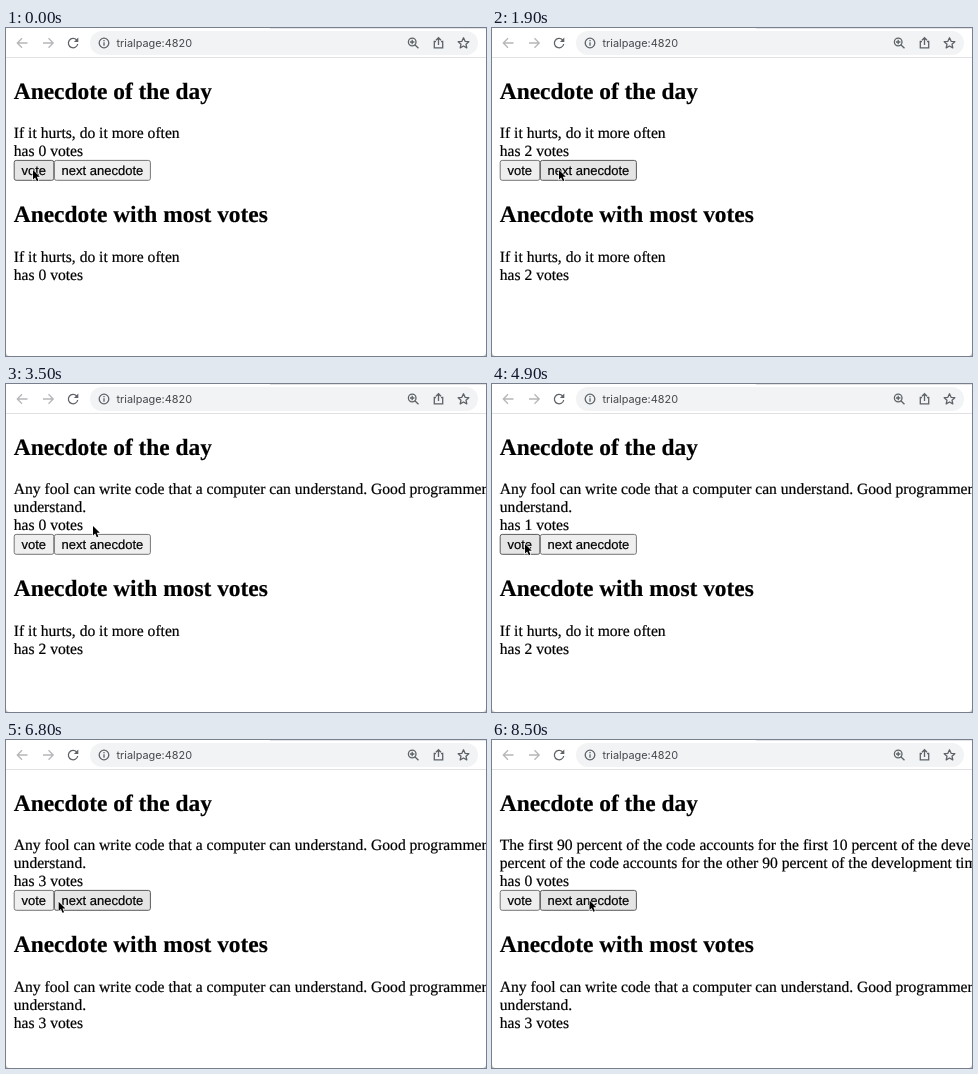
Recreate the animation shown at these times as an HTML page. Size 480x328 px, loop 9000 ms.

```html
<!DOCTYPE html>
<html lang="en">
<head>
<meta charset="utf-8">
<title>Anecdotes</title>
<style>
  html, body { margin: 0; width: 100%; height: 100%; overflow: hidden; background: #fff; }
  svg { display: block; }
  #page text {
    font: 15.6px "Liberation Serif", Times, serif;
    stroke: #000; stroke-width: .2px; text-rendering: geometricPrecision;
  }
  #page .heading { font-size: 23.4px; font-weight: bold; }
  #page .button text { font: 13px "Liberation Sans", Arial, sans-serif; text-anchor: middle; }
  .button rect { fill: #efefef; stroke: #767676; }
  .button.hover rect { fill: #e5e5e5; stroke: #5a5a5a; }
  .button.active rect { fill: #f5f5f5; stroke: #a0a0a0; }
  .icon { fill: none; stroke: #5f6368; stroke-width: 1.3; }
  .dim { stroke: #b4b6b9; }
  .address { font: 10.9px Inter, "Liberation Sans", sans-serif; fill: #45484c; }
</style>
</head>
<body>
<svg width="480" height="328" viewBox="0 0 480 328">
  <g id="page">
    <text class="heading" x="7.8" y="70.6">Anecdote of the day</text>
    <g id="daily"></g>
    <g id="lower">
      <g class="button" id="vote">
        <rect x="8.2" y="132.4" width="39.6" height="19.9" rx="2"/>
        <text x="27.8" y="146.9">vote</text>
      </g>
      <g class="button" id="next">
        <rect x="48.4" y="132.4" width="96" height="19.9" rx="2"/>
        <text x="96.4" y="146.9">next anecdote</text>
      </g>
      <text class="heading" x="7.8" y="194.2">Anecdote with most votes</text>
      <g id="best"></g>
    </g>
  </g>

  <g id="toolbar">
    <path d="M264 0H480V1H264Z" fill="#e2e4e7"/>
    <path d="M0 29.5H480" stroke="#dfe1e3"/>
    <rect x="84" y="3" width="388" height="24" rx="12" fill="#f1f3f4"/>
    <path class="icon dim" d="M21.5 15H11.5M16 10.3L11.3 15L16 19.7"/>
    <path class="icon dim" d="M37 15H47M42.5 10.3L47.2 15L42.5 19.7"/>
    <path class="icon" d="M70.6 12A4.7 4.7 0 1 0 71.7 16"/>
    <path d="M72.3 9.6V14H67.9Z" fill="#5f6368"/>
    <circle class="icon" cx="98" cy="15" r="4.8"/>
    <path class="icon" d="M98 14.3V17.7M98 12V13.2"/>
    <text class="address" x="110.5" y="18.8">trialpage:4820</text>
    <path class="icon" d="M408.8 16.8L412.5 20.3M404 14H408.4M406.2 11.8V16.2"/>
    <circle class="icon" cx="406.2" cy="14" r="3.8"/>
    <path class="icon" d="M430 13.5H428.3V19.8H436.7V13.5H435M432.5 17V10M430 12.2L432.5 9.7L435 12.2"/>
    <path class="icon" stroke-linejoin="round"
      d="M457.5 9.8L459.1 13.3L462.8 13.7L460 16.2L460.8 19.9L457.5 18L454.2 19.9L455 16.2L452.2 13.7L455.9 13.3Z"/>
  </g>
  <path d="M0 324A4 4 0 0 0 4 328H0ZM480 324A4 4 0 0 1 476 328H480Z" fill="#c4c4c4"/>

  <g id="cursor">
    <circle id="ring" r="15.8" fill="none" stroke="#111" stroke-width="2.4"/>
    <path d="M0 0V9.4L2.2 7.4L3.8 11.2L5.4 10.5L3.8 6.8H6.8Z" fill="#000"
      stroke="#fff" stroke-width="1.2" paint-order="stroke"/>
  </g>
</svg>
<script>
const LOOP = 9000, STEP = 100, LINE = 18;

const anecdotes = [
  ["If it hurts, do it more often"],
  ["Any fool can write code that a computer can understand. Good programmers", "understand."],
  ["The first 90 percent of the code accounts for the first 10 percent of the development",
   "percent of the code accounts for the other 90 percent of the development time"]
];

// [time, shown anecdote, its votes, leading anecdote, its votes]
const views = [
  [0, 0, 0, 0, 0], [500, 0, 1, 0, 1], [1200, 0, 2, 0, 2], [3500, 1, 0, 0, 2],
  [4900, 1, 1, 0, 2], [5600, 1, 2, 0, 2], [6200, 1, 3, 1, 3], [8500, 2, 0, 1, 3]
];

// [press, release]
const presses = [
  [400, 500], [1100, 1200], [2100, 2200], [3400, 3500],
  [4800, 4900], [5500, 5600], [6000, 6200], [8400, 8500]
];

// [first step, number of steps, x, y]
const moves = [
  [1800, 3, 87, 142], [3900, 2, 33, 160], [6800, 3, 92, 165],
  [7200, 1, 94, 162], [7400, 2, 97.5, 160.5]
];

const byId = id => document.getElementById(id);

function cursorAt(time) {
  let x = 27, y = 142;
  for (const [start, steps, toX, toY] of moves) {
    if (time < start) break;
    const progress = Math.min(1, ((time - start) / STEP + 1) / steps);
    x += (toX - x) * progress;
    y += (toY - y) * progress;
  }
  return [x, y];
}

function showAnecdote(group, index, votes, baseline) {
  const lines = [...anecdotes[index], `has ${votes} votes`];
  group.innerHTML = lines
    .map((line, i) => `<text x="7.8" y="${baseline + i * LINE}">${line}</text>`)
    .join("");
}

function render(time) {
  const [, shown, votes, leader, leaderVotes] = views.findLast(view => view[0] <= time);
  const shift = (anecdotes[shown].length - 1) * LINE;
  const [x, y] = cursorAt(time);
  const pressed = presses.some(([down, up]) => time >= down && time < up);

  showAnecdote(byId("daily"), shown, votes, 110);
  showAnecdote(byId("best"), leader, leaderVotes, 233.8);
  byId("lower").setAttribute("transform", `translate(0 ${shift})`);

  const inRow = y >= 132 + shift && y < 153 + shift;
  for (const [id, left, right] of [["vote", 8, 48], ["next", 48, 145]]) {
    const over = inRow && x >= left && x < right;
    byId(id).classList.toggle("hover", over && !pressed);
    byId(id).classList.toggle("active", over && pressed);
  }
  byId("cursor").setAttribute("transform", `translate(${x} ${y})`);
  byId("ring").style.display = pressed ? "" : "none";
}

const origin = performance.now();
let lastTime = -1;
function tick() {
  const elapsed = (performance.now() - origin) % LOOP;
  const time = Math.floor(elapsed / STEP) * STEP;
  if (time !== lastTime) render(lastTime = time);
  requestAnimationFrame(tick);
}
tick();
</script>
</body>
</html>
```
